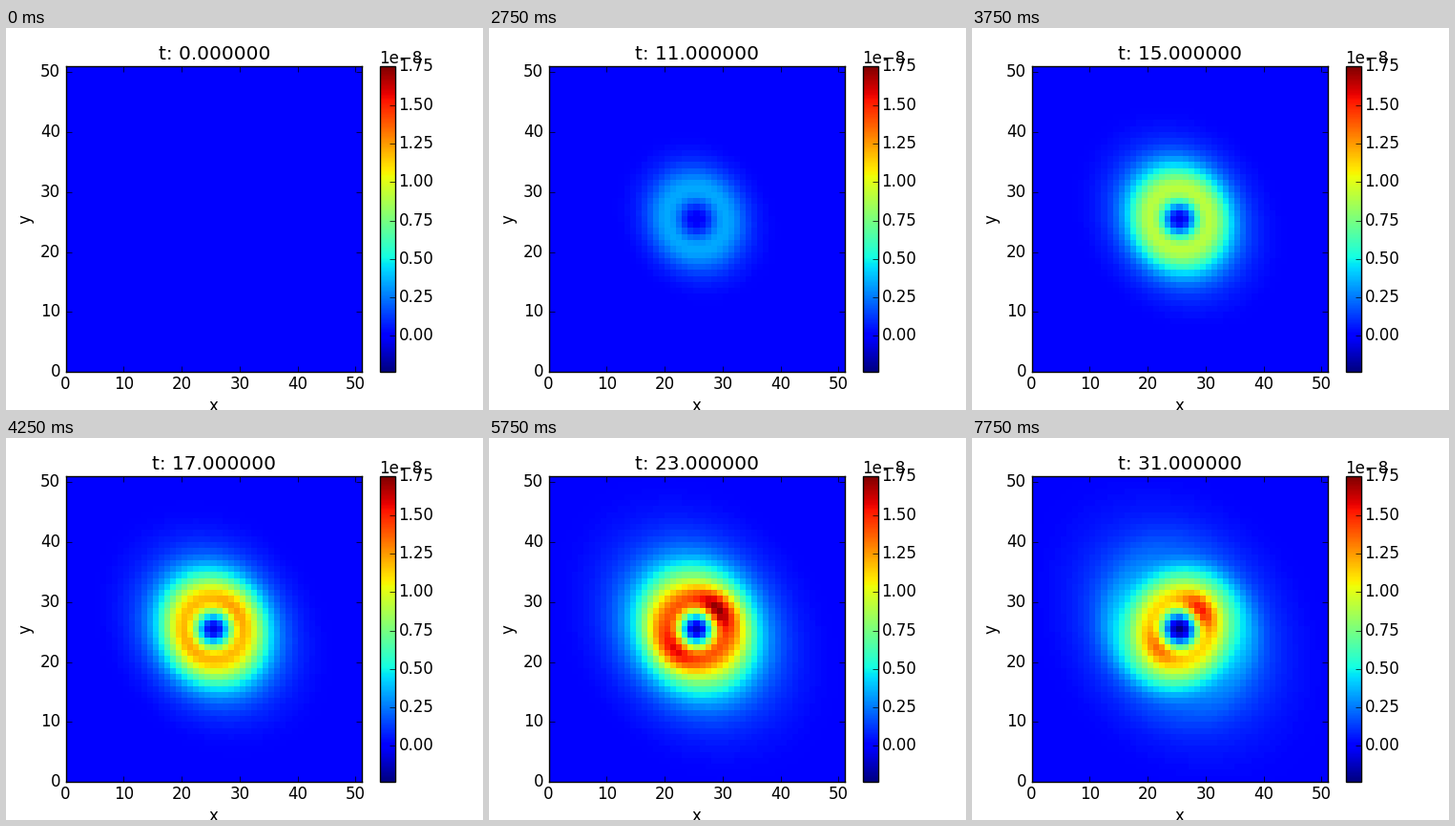
A matplotlib script that plays this animation: 500x400 px, repeating every 8 s.

```python
import numpy as np
import matplotlib.pyplot as plt
from matplotlib.animation import FuncAnimation

plt.rcParams.update({
    "font.family": "DejaVu Sans",
    "font.size": 12,
    "axes.linewidth": 1.0,
    "ytick.alignment": "center",
})

N = 51                       # cells per side
STEPS = 32
VMIN, VMAX = -0.233, 1.752   # in units of 1e-8
R0 = 5.0                     # radius of the ring's crest
AXIS = np.radians(42)        # direction of the two lobes

centres = np.arange(N) - N // 2
X, Y = np.meshgrid(centres, centres)
R = np.hypot(X, Y)
THETA = np.arctan2(Y, X) - AXIS


def smoothstep(x):
    x = np.clip(x, 0, 1)
    return x * x * (3 - 2 * x)


def ring(t):
    """Ring that grows, saturates and slowly fades, with a widening halo."""
    crest = (2.24 - 0.036 * t) * (1 - np.exp(-(t / 16) ** 4.2))
    core = -0.23 * (t / 31) ** 2.4
    width = min(7 + 0.75 * t, 22)
    tail = 7.5 - 0.09 * t

    # oval whose long axis turns by a quarter further out; the turn drifts outwards
    twist = -np.pi / 2 * smoothstep((R - 0.65 * t + 12) / 8)
    r = R * (1 - 0.005 * R * np.cos(2 * (THETA - twist)))

    d = r - R0
    inner = core + (crest - core) * np.sin(np.pi * r / (2 * R0)) ** 2
    outer = crest * np.exp(-d ** 2 / (width * np.sqrt(1 + (d / tail) ** 2)))
    return np.where(d < 0, inner, outer)


def lobes(t):
    """Two hot spots facing each other on the ring, one stronger."""
    c = np.cos(THETA)
    angular = np.where(c > 0, 1.0, 0.55) * c ** 4
    radial = np.exp(-((R - 4.6) / 2.1) ** 2)
    return 0.42 * smoothstep((t - 14) / 12) * angular * radial


def field(t):
    return ring(t) + lobes(t)


fig = plt.figure(figsize=(5, 4), dpi=100, facecolor="white")
ax = fig.add_axes([0.125, 0.1, 0.62, 0.8])
edges = np.arange(N + 1)
mesh = ax.pcolormesh(edges, edges, field(0), cmap="jet", vmin=VMIN, vmax=VMAX)
ax.set(xlim=(0, N), ylim=(0, N), xticks=range(0, N, 10), yticks=range(0, N, 10))
ax.set_xlabel("x", labelpad=3.6)
ax.set_ylabel("y", labelpad=4.6)
ax.tick_params(direction="in", length=4, width=0.5, pad=4, top=True, right=True)
ax.tick_params(axis="x", pad=2.6)
title = ax.set_title("", x=0.503, pad=5)

cax = fig.add_axes([0.78375, 0.1, 0.032, 0.8])
bar = fig.colorbar(mesh, cax=cax, ticks=np.arange(0, 1.8, 0.25), format="%.2f")
bar.ax.tick_params(direction="in", length=4, width=0.5, pad=2.6)
fig.text(0.78175, 0.907, "1e\u22128", ha="left", va="baseline")


def draw(t):
    mesh.set_array(field(t))
    title.set_text(f"t: {t:.6f}")
    return mesh, title


anim = FuncAnimation(fig, draw, frames=STEPS, interval=250, repeat=True)
plt.show()
```
